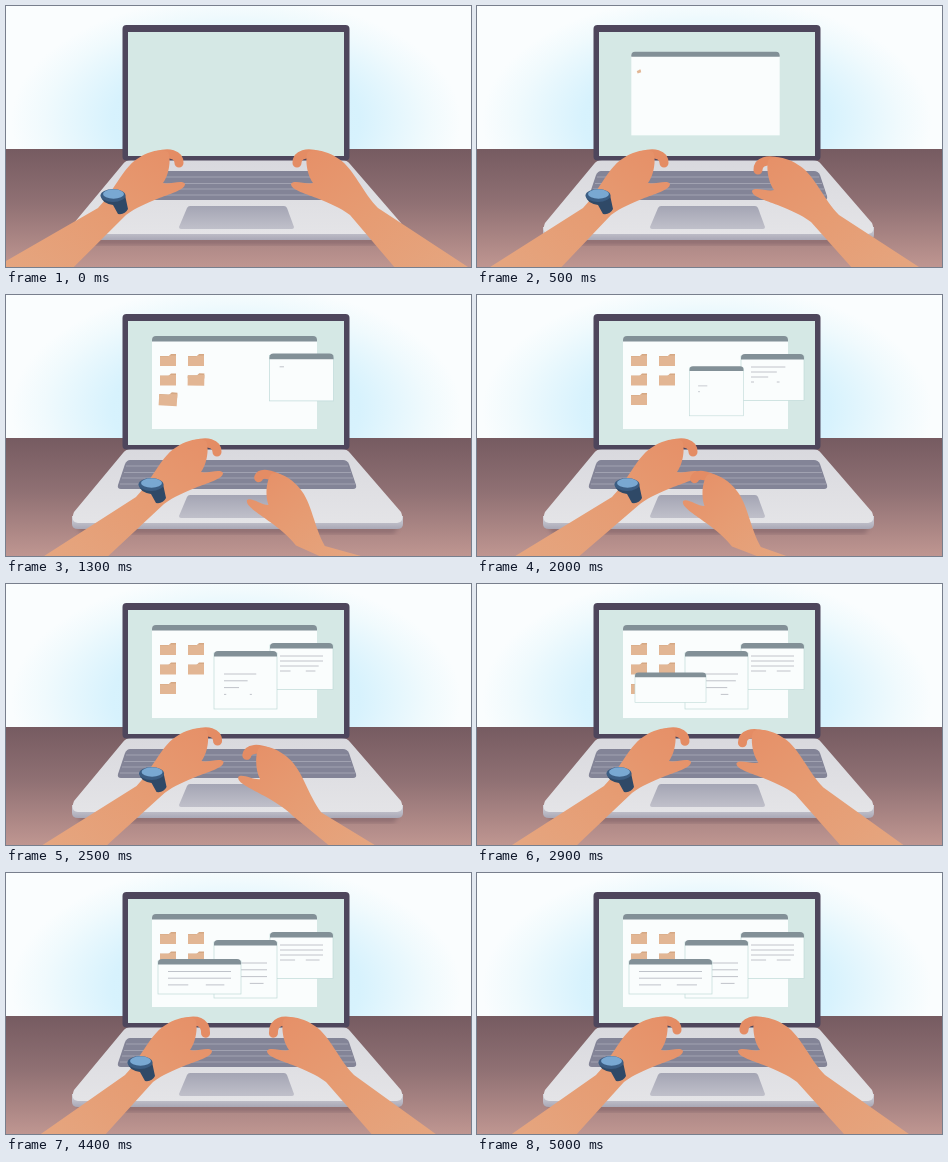
Write an HTML page that moves like this. It is 465 px wide and 261 px high and loops after 5.1 s.

```html
<!DOCTYPE html>
<html lang="en">
<head>
<meta charset="utf-8">
<title>Typing on a laptop</title>
<style>
html, body { margin: 0; width: 100%; height: 100%; overflow: hidden; background: #fbfefe; }
svg { display: block; width: 100vw; height: 100vh; }
</style>
</head>
<body>
<svg viewBox="0 0 465 261" preserveAspectRatio="none">
  <defs>
    <radialGradient id="wall" gradientUnits="userSpaceOnUse" cx="0" cy="0" r="1" gradientTransform="translate(230 115) scale(225 125)">
      <stop offset="0" stop-color="#cdedfb"/><stop offset=".55" stop-color="#d7f2fd"/>
      <stop offset=".85" stop-color="#f0fafd"/><stop offset="1" stop-color="#fafdfe"/>
    </radialGradient>
    <linearGradient id="desk" x2="0" y2="1">
      <stop offset="0" stop-color="#765b61"/><stop offset=".45" stop-color="#8f7073"/><stop offset="1" stop-color="#bf9691"/>
    </linearGradient>
    <linearGradient id="base" x2="0" y2="1">
      <stop offset="0" stop-color="#d9d9de"/><stop offset="1" stop-color="#e4e4e7"/>
    </linearGradient>
    <linearGradient id="edge" x2="0" y2="1">
      <stop offset="0" stop-color="#d3d3da"/><stop offset="1" stop-color="#a9a8b6"/>
    </linearGradient>
    <linearGradient id="pad" x2="0" y2="1">
      <stop offset="0" stop-color="#a4a5b4"/><stop offset="1" stop-color="#c0c0ca"/>
    </linearGradient>
    <linearGradient id="skin" y1="1" y2="0">
      <stop offset="0" stop-color="#e5a680"/><stop offset=".5" stop-color="#e69c73"/><stop offset="1" stop-color="#e68f67"/>
    </linearGradient>
    <filter id="soft"><feGaussianBlur stdDeviation="2"/></filter>
  </defs>

  <rect width="465" height="143" fill="url(#wall)"/>
  <rect y="143" width="465" height="118" fill="url(#desk)"/>

  <path d="M70 231H393L388 239H76Z" fill="#6b5058" opacity=".4" filter="url(#soft)"/>
  <path d="M66 221H397V229Q397 234 391 234H72Q66 234 66 229Z" fill="url(#edge)"/>
  <path d="M125 154H336Q341 154 344 158L395 217Q399 227 391 228H72Q64 227 68 217L117 158Q120 154 125 154Z" fill="url(#base)"/>
  <path d="M124 165H337Q341 165 343 169L350 190Q351 194 347 194H115Q111 194 112 190L119 169Q121 165 124 165Z" fill="#838497"/>
  <path d="M120 171H342M118 177.500H345M116 183H347M114 189H349" stroke="#a9aab8" stroke-width=".8"/>
  <path d="M184 200H278Q280 200 281 202L288 221Q288 223 286 223H175Q173 223 173 221L181 202Q182 200 184 200Z" fill="url(#pad)"/>
  <rect x="116.500" y="19" width="227" height="135.500" rx="4" fill="#4e465c"/>
  <rect x="122" y="26" width="216" height="124" fill="#d5e8e5"/>

  <g id="screen"></g>
  <g id="left"></g>
  <g id="right" transform="translate(467 0) scale(-1 1)"></g>
  <g id="watch">
    <path d="M122 189Q122 197 134 199L139 208Q146 209 149 203L146 189Z" fill="#2f4967"/>
    <ellipse cx="134" cy="189.500" rx="12.500" ry="6.500" fill="#3b5d83"/>
    <ellipse cx="134.500" cy="188" rx="10.500" ry="4.700" fill="#79a8d2"/>
  </g>
</svg>
<script>
const LOOP = 5100, STEP = 100, TYPE_MS = 1000, ROW_DELAY = 200;
const screenEl = document.getElementById("screen");
const clamp = v => Math.max(0, Math.min(1, v));
const mix = (a, b, k) => a + (b - a) * k;

function add(parent, tag, attrs) {
  const el = document.createElementNS("http://www.w3.org/2000/svg", tag);
  for (const k in attrs) el.setAttribute(k, attrs[k]);
  parent.appendChild(el);
  return el;
}

// Growth from 0 to 1 with an overshoot set by s
function pop(t, start, dur, s) {
  const p = clamp((t - start) / dur), u = p - 1;
  return p ? Math.max(0, 1 + (s + 1) * u ** 3 + s * u * u) : 0;
}

function zoom(el, cx, cy, k, turn = 0) {
  el.setAttribute("visibility", k > 0 ? "visible" : "hidden");
  el.setAttribute("transform", `translate(${cx} ${cy}) rotate(${turn}) scale(${k}) translate(${-cx} ${-cy})`);
}

function makeWindow({ x, y, w, h, start, rows = 0, top, gap, type }) {
  const el = add(screenEl, "g", {});
  add(el, "rect", { x, y: y + 2, width: w, height: h - 2, fill: "#fafdfd",
    stroke: "#bfdad8", "stroke-width": rows ? .7 : 0 });
  add(el, "path", { fill: "#829097", d: `M${x} ${y + 5.5}v-1.500q0 -4 4 -4h${w - 8}q4 0 4 4v1.500z` });
  const text = add(el, "path", { stroke: "#b9bdc5", "stroke-width": .9 });

  return t => {
    zoom(el, x + w / 2, y + h / 2, pop(t, start, 500, .8));
    let d = "";
    for (let i = 0; i < rows; i++) {
      const k = clamp((t - type - i * ROW_DELAY) / TYPE_MS);
      const parts = i < rows - 1 ? [[0, 1]] : [[0, .35], [.6, .92]];
      for (const [a, b] of parts)
        if (k) d += `M${x + 10 + a * (w - 20)} ${y + top + i * gap}h${(b - a) * (w - 20) * k}`;
    }
    text.setAttribute("d", d);
  };
}

function makeFolder(i) {
  const x = 154 + 28 * (i % 2), y = 59 + 19.5 * Math.floor(i / 2);
  const el = add(screenEl, "g", {});
  add(el, "path", { fill: "#d5a884", d: `M${x} ${y + 2}h9l2 -2h5v5h-16z` });
  add(el, "path", { fill: "#e2b694", d: `M${x} ${y + 2.5}h8l2 -1h6v10.500h-16z` });
  return t => {
    const k = pop(t, 480 + 160 * i, 400, 2.2);
    zoom(el, x + 8, y + 6.5, k, (k - 1) * 25);
  };
}

const parts = [
  makeWindow({ x: 146, y: 41, w: 165, h: 93, start: 300 }),
  ...Array.from({ length: 5 }, (_, i) => makeFolder(i)),
  makeWindow({ x: 264, y: 59, w: 63, h: 46.5, start: 900, rows: 4, top: 13, gap: 5, type: 1200 }),
  makeWindow({ x: 208, y: 67, w: 63, h: 58, start: 1820, rows: 4, top: 23, gap: 6.8, type: 1750 }),
  makeWindow({ x: 152, y: 86, w: 83, h: 35, start: 2720, rows: 3, top: 12.5, gap: 6.7, type: 3080 })
];

// Draws a left hand; the right one is its mirror image
function makeHand(id) {
  const g = document.getElementById(id);
  const finger = add(g, "path", { fill: "none", stroke: "#e48c64", "stroke-width": 9, "stroke-linecap": "round" });
  const body = add(g, "path", { fill: "url(#skin)" });

  return ({ x, y, arm, turn }, curl) => {
    const c = Math.cos(turn), s = Math.sin(turn);
    const P = (px, py) => {
      const dx = px - 172, dy = py - 150;
      return `${172 + x + dx * c - dy * s} ${150 + y + dx * s + dy * c} `;
    };
    body.setAttribute("d",
      `M${32 + arm} 263L${P(119, 202)}C${P(134, 187)}${P(143, 163)}${P(158, 153)}` +
      `C${P(166, 147)}${P(181, 141)}${P(189, 146)}C${P(192, 151)}${P(191, 167)}${P(184, 177)}` +
      `C${P(190, 179)}${P(204, 173)}${P(206, 178)}C${P(206, 184)}${P(190, 188)}${P(178, 193)}` +
      `C${P(166, 198)}${P(158, 201)}${P(147, 209)}L${98 + arm * .7} 263Z`);
    finger.setAttribute("d",
      `M${P(178, 149.5)}C${P(190, 146)}${P(200, 148 + 2 * curl)}${P(200 - 2 * curl, 157 + 15 * curl)}`);
  };
}

const drawLeft = makeHand("left"), drawRight = makeHand("right");

// Inward and downward shift, forearm shift and turn at each time
const key = (t, x, y, arm, turn = 0) => ({ t, x, y, arm, turn });
const leftKeys = [key(0, -27, 0, -46), key(500, -13, 0, -22), key(1300, 11, 0, 3),
  key(2000, 16, 0, 3), key(2900, 8, 0, 0), key(3700, 0, 0, 0), key(LOOP, 0, 0, 0)];
const rightKeys = [key(0, -24, 0, -30), key(500, -14, 7, -10), key(1200, 14, 37, 73, -.26),
  key(1300, 14, 37, 73, -.26), key(2000, 49, 38, 120, -.26), key(2300, 49, 38, 120, -.26),
  key(2700, 2, 2, 6), key(3700, 0, 0, 5), key(LOOP, 0, 0, 0)];

function at(keys, t) {
  const i = keys.findIndex(k => k.t > t), a = keys[i - 1], b = keys[i];
  const k = (t - a.t) / (b.t - a.t), out = {};
  for (const n in a) out[n] = mix(a[n], b[n], k);
  return out;
}

function draw(t) {
  parts.forEach(p => p(t));
  const tap = t < 2900 ? 0 : (1 + Math.cos((t - 3700) / 520 * 2 * Math.PI)) / 2;
  const l = at(leftKeys, t), r = at(rightKeys, t);
  drawLeft(l, tap);
  drawRight(r, tap + r.turn);
  document.getElementById("watch").setAttribute("transform", `translate(${l.x} ${l.y})`);
}

const begin = performance.now();
function tick() {
  const t = (performance.now() - begin) % LOOP;
  draw(Math.floor(t / STEP) * STEP);
  requestAnimationFrame(tick);
}
tick();
</script>
</body>
</html>
```
